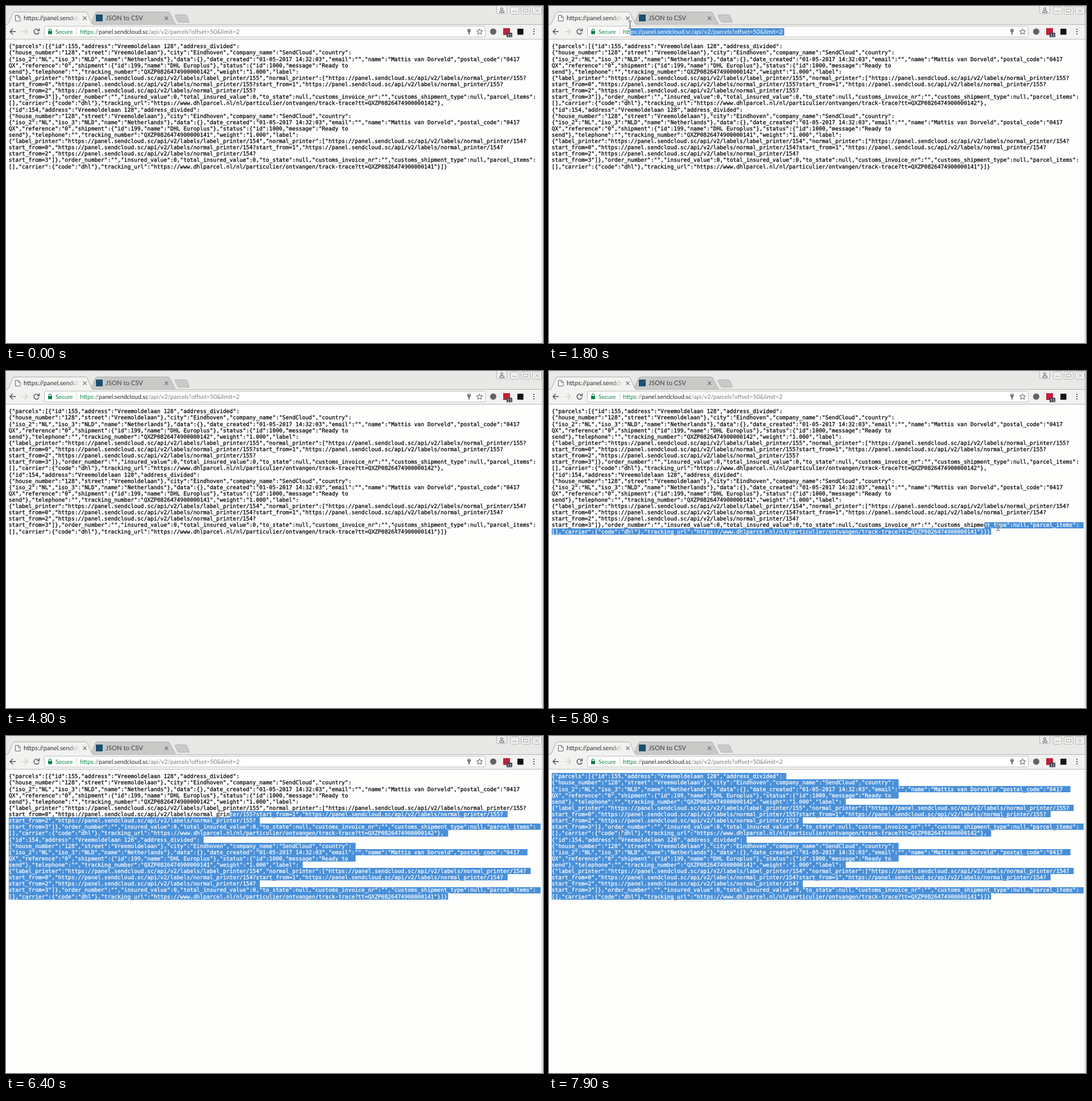
These frames come from a looping animation (944 px wide and 593 px high, 8000 ms). An HTML page:

```html
<!DOCTYPE html>
<html lang="en">
<head>
<meta charset="utf-8">
<title>Parcels</title>
<style>
html, body { margin: 0; width: 100%; height: 100%; overflow: hidden; background: #fefefd; }
svg { display: block; width: 944px; height: 593px; }
text { white-space: pre; text-rendering: geometricPrecision; font: 10.55px Lato, sans-serif; }
.mono text { font: 9.647px "DejaVu Sans Mono", monospace; stroke-width: .25; }
.line { fill: none; stroke: #4c4c4c; stroke-width: 1.4; }
</style>
</head>
<body>
<svg viewBox="0 0 944 593">
  <defs>
    <linearGradient id="fade" gradientUnits="userSpaceOnUse" x1="108" x2="130">
      <stop stop-color="#2c2c2c"/><stop offset="1" stop-color="#2c2c2c" stop-opacity="0"/>
    </linearGradient>
    <clipPath id="pageClip"><path id="pageSel"/></clipPath>
    <clipPath id="urlClip"><rect id="urlSel" y="39" height="13"/></clipPath>
    <clipPath id="titleClip"><rect x="30" y="12" width="99" height="20"/></clipPath>
    <g id="lines" class="mono"></g>
    <path id="beam" d="M-3-6.500H-1L0-5.500L1-6.500H3M0-5.500V5.500M-3 6.500H-1L0 5.500L1 6.500H3"/>
  </defs>

  <!-- tab strip -->
  <rect width="944" height="33" fill="#e8e9e7"/>
  <path d="M149 32.500L157 13Q158 10.500 161 10.500H284Q287 10.500 288 13L298 32.500z" fill="#c9cac8" stroke="#abaca9"/>
  <path d="M298.500 15.500H315Q317 15.500 318 17L322.500 28.500H305Q303 28.500 302 27L297 17Q296.500 15.500 298.500 15.500z" fill="#c9cac8" stroke="#b2b3b0"/>
  <rect y="32" width="944" height="27" fill="#f2f2f0"/>
  <path d="M0 32.500H944" stroke="#b4b5b2"/>
  <path d="M1 33Q4 32 5 29L12 13Q13 10.500 16 10.500H139Q142 10.500 143 13L150 29Q151 32 154 33z" fill="#f2f2f0"/>
  <path d="M1 32.500Q4 32 5 29L12 13Q13 10.500 16 10.500H139Q142 10.500 143 13L150 29Q151 32 154 32.500" fill="none" stroke="#abaca9"/>
  <path d="M16.500 16.500H22L25 19.500V26.500H16.500zM21.500 16.500V20H25" fill="#fff" stroke="#666"/>
  <text x="31" y="25" style="font-size:11.100px" fill="url(#fade)" clip-path="url(#titleClip)">https://panel.sendcloud.sc</text>
  <rect x="158" y="15" width="12" height="12" fill="#19506f"/>
  <text x="175" y="25" style="font-size:11.300px" fill="#404040">JSON to CSV</text>
  <path class="line" d="M135.500 18.500l6 6m0-6l-6 6M279 18.500l6 6m0-6l-6 6" style="stroke:#707070;stroke-width:1.200"/>

  <!-- window buttons -->
  <g fill="#eeefed" stroke="#b5b6b3">
    <path d="M862.500 0V11Q862.500 13.500 865 13.500H878Q880.500 13.500 880.500 11V0"/>
    <rect x="886.500" y="1.500" width="15" height="13" rx="2"/>
    <rect x="905.500" y="1.500" width="16" height="13" rx="2"/>
    <rect x="925.500" y="1.500" width="16" height="13" rx="2"/>
    <path d="M890 9.500h8M909.500 5.500h8v5h-8zM930 4.500l7 7m0-7l-7 7" fill="none" stroke="#a5a6a3"/>
  </g>
  <path d="M869.500 5a2 2 0 1 1 4 0a2 2 0 1 1-4 0M868 11.500V10Q868 8.500 870 8.500H873.500Q875.500 8.500 875.500 10V11.500z" fill="none" stroke="#555"/>

  <!-- toolbar -->
  <path class="line" d="M17 45H7M12 40l-5 5l5 5"/>
  <path class="line" d="M28 45H38M33 40l5 5l-5 5" style="stroke:#cfcfcd"/>
  <path class="line" d="M57 42A4.500 4.500 0 1 0 58 46.500M58.500 39.500V43.500H54.500"/>
  <rect x="67.500" y="35.500" width="775" height="19" rx="2" fill="#fff" stroke="#bfc0bd"/>
  <rect x="74" y="44" width="7" height="5.500" rx=".5" fill="#0b8043"/>
  <path d="M75.500 44V42.500a2 2 0 0 1 4 0V44" fill="none" stroke="#0b8043" stroke-width="1.200"/>
  <text x="87" y="49" style="font-size:10.200px" fill="#0b8043">Secure</text>
  <path d="M124.500 38V52" stroke="#d4d4d2"/>
  <text x="130" y="49" fill="#7c7c7c"><tspan fill="#0b8043">https</tspan>://<tspan fill="#222">panel.sendcloud.sc</tspan>/api/v2/parcels?offset=50&amp;limit=2</text>
  <g clip-path="url(#urlClip)">
    <rect x="120" y="36" width="300" height="18" fill="#4a90d9"/>
    <text id="url" x="130" y="49" fill="#fff">https://panel.sendcloud.sc/api/v2/parcels?offset=50&amp;limit=2</text>
  </g>
  <path d="M811 43a3 3 0 1 1 6 0a3 3 0 1 1-6 0M813 45h2v5h-2z" fill="#666"/>
  <circle cx="814" cy="42" r="1" fill="#fff"/>
  <path d="M832.500 40l1.500 3.500l3.700.3l-2.800 2.400l.9 3.600l-3.300-2l-3.300 2l.9-3.600l-2.800-2.400l3.700-.3z" fill="none" stroke="#555"/>
  <circle cx="856.500" cy="45" r="5.500" fill="#626464"/>
  <rect x="874" y="39" width="12" height="12" fill="#c41f38"/>
  <rect x="880" y="47" width="10" height="8" rx="1" fill="#3c4650"/>
  <text x="881" y="54" style="font-size:7px" fill="#fff">11</text>
  <rect x="899" y="40" width="10.500" height="10.500" fill="#111"/>
  <path d="M928 40v2m0 2v2m0 2v2" stroke="#555" stroke-width="2"/>
  <path d="M0 58.500H944" stroke="#b9bab7"/>

  <!-- page -->
  <rect y="59" width="944" height="534" fill="#fefefd"/>
  <use href="#lines" fill="#000" stroke="#000"/>
  <g clip-path="url(#pageClip)">
    <rect y="60" width="944" height="240" fill="#4a90d9"/>
    <use href="#lines" fill="#fff" stroke="#fff"/>
  </g>
  <path d="M942.500 0V593" stroke="#b4b5b2"/>
  <g id="pointer" fill="none">
    <use href="#beam" stroke="#fff" stroke-width="2.400" opacity=".7"/>
    <use href="#beam" stroke="#222"/>
  </g>
</svg>
<script>
const $ = id => document.getElementById(id);
const LEFT = 4.8, CELL = 5.808, ROW = 11.12, BASE = 74.3, ASCENT = 8.95;
const api = 'https://panel.sendcloud.sc/api/v2/labels/';

const parcel = (id, track) => `{"id":${id},"address":"Vreemoldelaan 128","address_divided":
{"house_number":"128","street":"Vreemoldelaan"},"city":"Eindhoven","company_name":"SendCloud","country":
{"iso_2":"NL","iso_3":"NLD","name":"Netherlands"},"data":{},"date_created":"01-05-2017 14:32:03","email":"","name":"Mattis van Dorveld","postal_code":"0417 
QX","reference":"0","shipment":{"id":199,"name":"DHL Europlus"},"status":{"id":1000,"message":"Ready to 
send"},"telephone":"","tracking_number":"${track}","weight":"1.000","label":
{"label_printer":"${api}label_printer/${id}","normal_printer":["${api}normal_printer/${id}?
start_from=0","${api}normal_printer/${id}?start_from=1","${api}normal_printer/${id}?
start_from=2","${api}normal_printer/${id}?
start_from=3"]},"order_number":"","insured_value":0,"total_insured_value":0,"to_state":null,"customs_invoice_nr":"","customs_shipment_type":null,"parcel_items":
[],"carrier":{"code":"dhl"},"tracking_url":"https://www.dhlparcel.nl/nl/particulier/ontvangen/track-trace?tt=${track}"}`;

const lines = ('{"parcels":[' + parcel(155, 'QXZP0826474900000142') + ',\n' +
  parcel(154, 'QXZP0826474900000141') + ']}').split('\n');

lines.forEach((line, i) => {
  const text = document.createElementNS('http://www.w3.org/2000/svg', 'text');
  text.setAttribute('x', LEFT);
  text.setAttribute('y', BASE + i * ROW);
  text.textContent = line;
  $('lines').append(text);
});

// Each key: time, x, y
const pointerKeys = [
  [0, -20, 189], [100, 255, 189], [500, 417, 66], [600, 417, 66], [800, 417, 44], [1100, 417, 44],
  [1800, 142, 33], [1900, 142, 33], [2200, 129, 39], [2900, 129, 39], [3000, 131, 42],
  [3100, 131, 42], [3800, 371, 270], [3900, 371, 270], [4300, 376, 276], [4500, 376, 276],
  [4800, 684, 278], [5400, 822, 291], [5700, 822, 291], [6100, 690, 222], [6400, 374, 137],
  [6600, 10, 118], [7000, 16, 45], [7500, 16, 45], [7900, 125, 171]
];
const dragKeys = [[5700, 777, 283], [6100, 725, 238], [6400, 394, 138], [6600, 15, 116], [7000, 4, 70]];

function at(keys, t) {
  const i = keys.findIndex(k => k[0] > t);
  if (i < 0) return keys.at(-1).slice(1);
  if (i === 0) return keys[0].slice(1);
  const a = keys[i - 1], b = keys[i], p = (t - a[0]) / (b[0] - a[0]);
  return [a[1] + (b[1] - a[1]) * p, a[2] + (b[2] - a[2]) * p];
}

function nearestChar(x) {
  const url = $('url');
  let best = 130;
  for (let i = 0; i < url.getNumberOfChars(); i++) {
    const pos = url.getStartPositionOfChar(i).x;
    if (Math.abs(pos - x) < Math.abs(best - x)) best = pos;
  }
  return best;
}

function pageSelection(t) {
  if (t < 5800) return '';
  const [x, y] = at(dragKeys, t);
  const top = i => Math.round(BASE - ASCENT + i * ROW);
  const last = lines.length - 1;
  const first = Math.max(0, Math.min(last, Math.floor((y - BASE + ASCENT) / ROW)));
  let d = '';
  for (let i = first; i <= last; i++) {
    const start = i === first ? Math.max(0, Math.round((x - LEFT) / CELL)) : 0;
    const end = lines[i].length + (i < last);
    const x1 = LEFT + Math.min(start, end) * CELL;
    d += `M${x1} ${top(i)}H${LEFT + end * CELL}V${top(i + 1)}H${x1}z`;
  }
  return d;
}

function draw(now) {
  const t = Math.floor(now % 8000 / 100) * 100;
  const [x, y] = at(pointerKeys, t);
  $('pointer').setAttribute('transform', `translate(${Math.round(x) + .5} ${Math.round(y)})`);
  const from = t < 1200 || t >= 4200 ? 413.5 : t < 2200 ? nearestChar(x) : 129.5;
  $('urlSel').setAttribute('x', from);
  $('urlSel').setAttribute('width', 413.5 - from);
  $('pageSel').setAttribute('d', pageSelection(t));
  requestAnimationFrame(draw);
}
requestAnimationFrame(draw);
</script>
</body>
</html>
```
